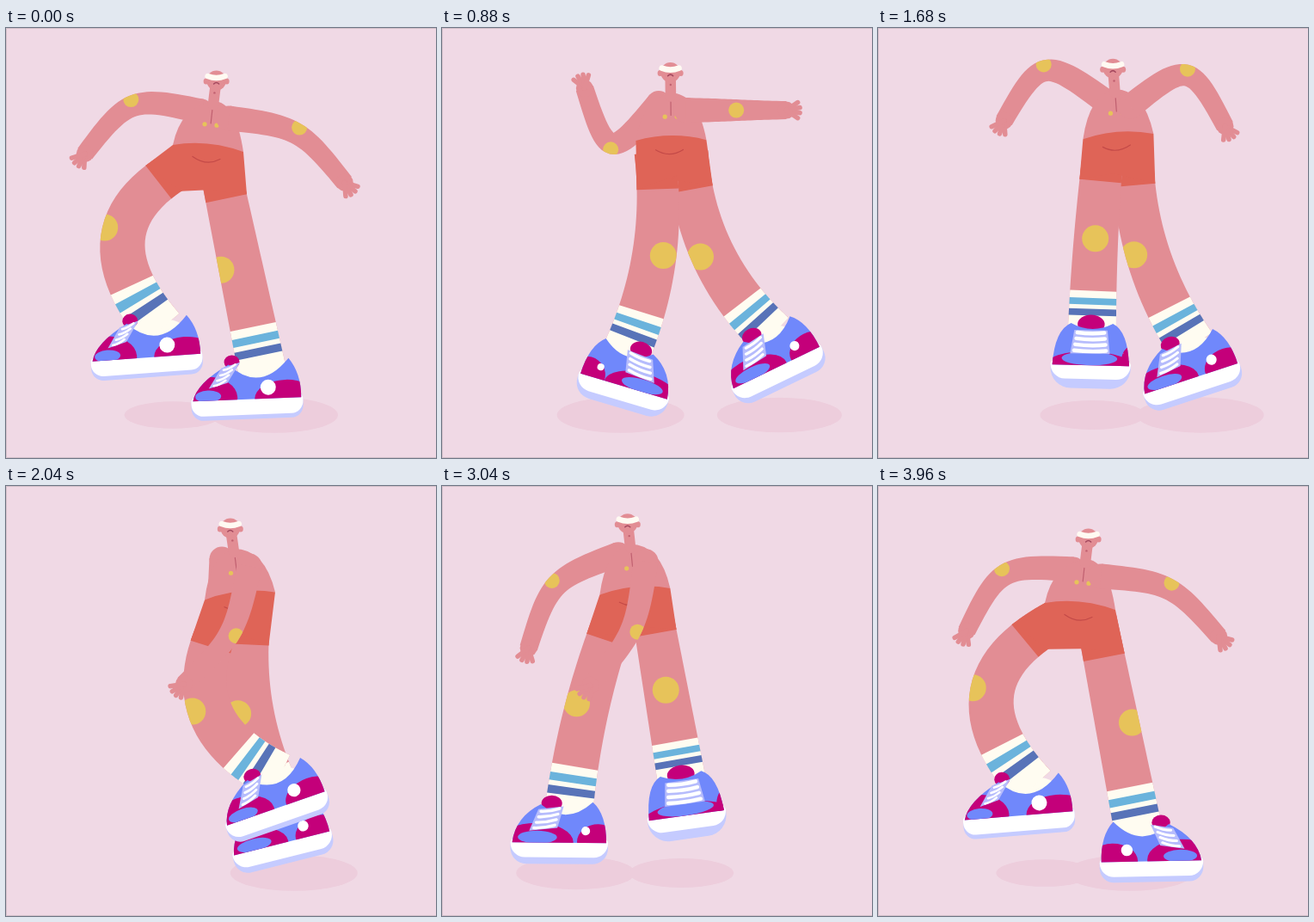
An HTML page with a canvas that plays this animation: 500 px wide and 500 px high, repeating every 4 s.

```html
<!DOCTYPE html>
<html lang="en">
<head>
<meta charset="utf-8">
<title>Dancer in sneakers</title>
<style>
html, body { margin: 0; width: 100%; height: 100%; overflow: hidden; background: #f0d9e5; }
canvas { display: block; width: 100vmin; height: 100vmin; }
</style>
</head>
<body>
<canvas width="500" height="500"></canvas>
<script>
const ctx = document.querySelector('canvas').getContext('2d');
const LOOP = 4000, STEP = 40, ARM = 162, LEG = 250;
const SKIN = '#e28d94', LINE = '#c06070', SHORTS = '#df6457', YELLOW = '#e7c35a', CREAM = '#fffcf1';
const MAGENTA = '#c4007a', BLUE = '#7088fb', LAVENDER = '#b6bcfc';

// Key poses, left limb first. waist: x, y, lean; feet: x, y, yaw (-1 left, 1 right);
// hands: direction from the shoulder in degrees, reach. Everything else follows from these.
const opening = { at: 0, waist: [235, 140, 6], feet: [[180, 350, -1], [298, 399, -1]], hands: [[160, 144], [29, 154]] };
const poses = [
  opening,
  { at: 400, waist: [244, 138, 0], feet: [[237, 385, 0], [384, 354, -.6]], hands: [[147, 104], [78, 158]] },
  { at: 1360, waist: [282, 125, -1], feet: [[191, 364, .65], [383, 364, -.65]], hands: [[236, 81], [-78, 75]] },
  { at: 2040, waist: [272, 128, -7], feet: [[318, 338, -.85], [325, 378, -.7]], hands: [[86, 161], [119, 157]] },
  { at: 2600, waist: [232, 129, 5], feet: [[110, 360, -.55], [233, 390, 0]], hands: [[85, 161], [79, 152]] },
  { at: 3400, waist: [222, 118, -13], feet: [[177, 386, -.6], [312, 304, 0]], hands: [[170, 143], [140, 162]] },
  { ...opening, at: 3960, feet: [opening.feet[0], [303, 402, .75]], hands: [[150, 143], [27, 154]] }
];

const lerp = (a, b, k) => a + (b - a) * k;

// Periodic Hermite interpolation with limited slopes, so poses never overshoot.
function sample(time, pick) {
  const n = poses.length;
  const pose = i => poses[(i + n) % n];
  const at = i => pose(i).at + Math.floor(i / n) * LOOP;
  const i = poses.findLastIndex(p => p.at <= time);
  const span = at(i + 1) - at(i), u = (time - at(i)) / span;
  return pick(pose(i)).map((a, c) => {
    const value = j => pick(pose(j))[c];
    const slope = j => (value(j + 1) - value(j)) / (at(j + 1) - at(j));
    const tangent = j => {
      const p = slope(j - 1), q = slope(j);
      return p * q <= 0 ? 0 : 2 * p * q / (p + q);
    };
    return lerp(a, value(i + 1), u * u * (3 - 2 * u))
      + span * u * (1 - u) * ((1 - u) * tangent(i) - u * tangent(i + 1));
  });
}

function fill(color) { ctx.fillStyle = color; ctx.fill(); }

function ellipse(x, y, rx, ry, color) {
  ctx.beginPath();
  ctx.ellipse(x, y, rx, ry, 0, 0, 7);
  fill(color);
}

function line(x0, y0, cx, cy, x1, y1, width, color) {
  ctx.beginPath();
  ctx.moveTo(x0, y0);
  ctx.quadraticCurveTo(cx, cy, x1, y1);
  ctx.lineWidth = width;
  ctx.strokeStyle = color;
  ctx.stroke();
}

function polygon(points, color) {
  ctx.beginPath();
  points.forEach(p => ctx.lineTo(...p));
  fill(color);
}

// The middle joint moves sideways as the ends come closer than the limb is long.
function middleJoint([x0, y0], [x1, y1], length, side) {
  const dx = x1 - x0, dy = y1 - y0, d = Math.hypot(dx, dy);
  const bulge = side * .45 * Math.sqrt(Math.max(0, length * length - d * d));
  return [(x0 + x1) / 2 - dy / d * bulge, (y0 + y1) / 2 + dx / d * bulge];
}

// A tapered tube through three joints; a higher bend makes the middle joint sharper.
function makeLimb(start, middle, end, bend, startWidth, endWidth) {
  const axis = k => {
    const a = start[k], b = end[k];
    const c = (middle[k] - (.5 - .375 * bend) * (a + b)) / (.75 * bend);
    const p = lerp(a, c, bend), q = lerp(b, c, bend);
    return t => {
      const s = 1 - t;
      return [s*s*s*a + 3*s*s*t*p + 3*s*t*t*q + t*t*t*b,
              s*s*(p - a) + 2*s*t*(q - p) + t*t*(b - q)];
    };
  };
  const fx = axis(0), fy = axis(1);
  const offset = (t, d) => {
    const [x, dx] = fx(t), [y, dy] = fy(t), len = Math.hypot(dx, dy) || 1;
    return [x - dy / len * d, y + dx / len * d];
  };
  const edge = (t, side) => offset(t, side * lerp(startWidth, endWidth, t) / 2);
  const band = (t0, t1, color) => {
    const left = [], right = [];
    for (let i = 0; i <= 28; i++) {
      const t = lerp(t0, t1, i / 28);
      left.push(edge(t, 1));
      right.unshift(edge(t, -1));
    }
    polygon(left.concat(right), color);
  };
  const patch = (d, r) => {
    ctx.save();
    band(0, 1, SKIN);
    ctx.clip();
    ellipse(...offset(.5, d), r, r, YELLOW);
    ctx.restore();
  };
  return { offset, edge, band, patch };
}

function drawArm(shoulder, [degrees, reach], side) {
  const angle = degrees * Math.PI / 180;
  const wrist = [shoulder[0] + Math.cos(angle) * reach, shoulder[1] + Math.sin(angle) * reach];
  const fold = -side * Math.tanh(8 * Math.sin(angle));
  const elbow = middleJoint(shoulder, wrist, ARM, fold);
  const arm = makeLimb(shoulder, elbow, wrist, .95, 29, 21);
  ellipse(...shoulder, 14.5, 14.5, SKIN);
  arm.patch(8 * fold, 9);
  const [x, y] = wrist, [bx, by] = arm.offset(.92, 0);
  const aim = Math.atan2(y - by, x - bx);
  ellipse(x, y, 10, 10, SKIN);
  for (let i = 0; i < 4; i++) {
    const a = aim - .6 + i * .4;
    line(x, y, x, y, x + Math.cos(a) * 16, y + Math.sin(a) * 16, 5.5, SKIN);
  }
}

// Every measure is mixed from a front view and a side view facing left.
function drawShoe([x, y], tilt, yaw) {
  const turn = Math.abs(yaw), mix = (front, side) => lerp(front, side, turn);
  const mid = mix(0, -19), half = mix(46, 65), top = mix(38, 27), height = mix(32, 28);
  const sole = (h, color) => {
    ctx.beginPath();
    ctx.roundRect(mid - half, top, half * 2, h, [6, 6, mix(24, 14), mix(24, 14)]);
    fill(color);
  };
  const lace = (i, extra = 0) => {
    const cx = mix(0, -38 - 4 * i), cy = mix(5 + 7 * i, -6 + 6 * i);
    const reach = mix(16 + i, 7) + extra, drop = mix(0, 3);
    return [[cx - reach, cy + drop], [cx + reach, cy - drop]];
  };
  ctx.save();
  ctx.translate(x, y);
  ctx.rotate(tilt);
  if (yaw > 0) ctx.scale(-1, 1);
  sole(height, '#c5cbff');
  sole(height - mix(11, 5), '#fff');
  ellipse(mix(0, -35), mix(-5, -12), mix(16, 9), mix(11, 8), MAGENTA);

  ctx.save();
  ctx.beginPath();
  ctx.moveTo(mid - half + 2, top + 5);
  ctx.quadraticCurveTo(mix(-42, -77), mix(2, 11), mix(-24, -39), mix(-6, -9));
  ctx.quadraticCurveTo(mix(0, -4), mix(6, 26), mix(24, 31), mix(-6, -14));
  ctx.quadraticCurveTo(mix(42, 45), mix(2, 4), mid + half - 2, top + 5);
  fill(BLUE);
  ctx.clip();
  ellipse(mix(0, -66), mix(45, 29), mix(52, 36), mix(18, 25), MAGENTA);
  ellipse(mix(0, -64), mix(35, 27), mix(33, 15), mix(8, 7), BLUE);
  ellipse(mix(46, 26), mix(40, 32), mix(10, 36), mix(20, 21), MAGENTA);
  ellipse(mix(38, 6), mix(28, 19), 9 * turn, 9 * turn, '#fff');
  ctx.restore();

  const [a, b] = lace(-.4, 4), [c, d] = lace(3.5, 4);
  polygon([a, b, d, c], LAVENDER);
  for (let i = 0; i < 4; i++) {
    const [[lx, ly], [rx, ry]] = lace(i);
    line(lx, ly, (lx + rx) / 2, (ly + ry) / 2 + 2, rx, ry, mix(4.5, 2.5), '#fff');
  }
  ctx.restore();
}

function makeLeg(hip, [x, y, yaw]) {
  const ankle = [x, y], knee = middleJoint(hip, ankle, LEG, -yaw);
  const shin = Math.atan2(x - knee[0], y - knee[1]);
  const tilt = -.8 * shin * (1 - .75 * yaw * yaw) + .1 * Math.sin(Math.PI * yaw);
  return { ...makeLimb(hip, knee, ankle, 2 / 3, 47, 56), ankle, tilt, yaw };
}

function drawShadow({ ankle: [x, y], tilt, yaw }) {
  const bottom = y + 70 - 15 * Math.abs(yaw) + 70 * Math.abs(Math.sin(tilt));
  const rx = 74 - .42 * Math.max(0, 452 - bottom);
  ellipse(x - 14 * yaw, 450, rx, rx * .28, '#edcddc');
}

function drawLeg(leg) {
  leg.patch(-23 * leg.yaw, 15.5);
  leg.band(0, .18, SHORTS);
  ellipse(...leg.ankle, 27, 12, CREAM);
  leg.band(.79, 1, CREAM);
  leg.band(.83, .867, '#6bb3dc');
  leg.band(.89, .927, '#5873b8');
  drawShoe(leg.ankle, leg.tilt, leg.yaw);
}

function drawTorso([x, y], [nx, ny], tilt, leftLeg, rightLeg) {
  const lx = x - 41, rx = x + 41, ly = y - 41 * tilt, ry = y + 41 * tilt;
  const down = k => [lerp(nx, x, k), lerp(ny, y, k)];

  ctx.beginPath();
  ctx.moveTo(lx, ly);
  ctx.quadraticCurveTo(lerp(lx, nx, .2), ny + 6, nx, ny);
  ctx.quadraticCurveTo(lerp(rx, nx, .25), ny, rx, ry);
  fill(SKIN);

  ctx.beginPath();
  ctx.moveTo(lx, ly);
  ctx.quadraticCurveTo(x, y - 11, rx, ry);
  [rightLeg.edge(.18, -1), rightLeg.edge(.12, 1), leftLeg.edge(.12, -1), leftLeg.edge(.18, 1)]
    .forEach(p => ctx.lineTo(...p));
  fill(SHORTS);

  const smileX = x - 2, smileY = y + 11;
  line(smileX - 16, smileY - 16 * tilt, smileX, smileY + 10, smileX + 16, smileY + 16 * tilt, 1.2, '#c44a48');
  line(...down(.15), ...down(.3), ...down(.47), 1.2, LINE);
  const [cx, cy] = down(.5);
  for (const d of [-7, 7]) ellipse(cx + d, cy + d * tilt, 2.6, 2.6, YELLOW);
}

function drawHead([nx, ny], [hx, hy]) {
  line(nx, ny + 4, (nx + hx) / 2, (ny + hy) / 2, hx, hy, 12.5, SKIN);
  ellipse(hx, hy, 11.5, 11.5, SKIN);
  for (const d of [-12, 12]) ellipse(hx + d, hy + 1, 3, 3.5, SKIN);
  line(hx - 10, hy - 5, hx, hy - 1, hx + 10, hy - 5, 6.5, '#fffaf2');
  line(hx - 3, hy + 4, hx, hy + 1, hx + 3, hy + 4, 1.5, '#a4485e');
  ellipse(lerp(hx, nx, .6), lerp(hy, ny, .6), 1.2, 1.2, LINE);
}

function draw(time) {
  const [x, y, lean] = sample(time, p => p.waist);
  const feet = [0, 1].map(i => sample(time, p => p.feet[i]));
  const hands = [0, 1].map(i => sample(time, p => p.hands[i]));
  const tilt = .13 * Math.tanh(lean / 6);
  const neck = [x + lean, y - 55], head = [neck[0] + lean * .6, neck[1] - 24];
  const spread = 20 - 4 * Math.abs(feet[0][2] + feet[1][2]);
  const [leftLeg, rightLeg] = [-spread, spread].map((d, i) => makeLeg([x + d, y + 13 + d * tilt], feet[i]));

  ctx.fillStyle = '#f0d9e5';
  ctx.fillRect(0, 0, 500, 500);
  drawShadow(leftLeg);
  drawShadow(rightLeg);
  drawArm([neck[0] - 14, neck[1] + 12], hands[0], -1);
  drawLeg(rightLeg);
  drawLeg(leftLeg);
  drawTorso([x, y], neck, tilt, leftLeg, rightLeg);
  drawHead(neck, head);
  drawArm([neck[0] + 18, neck[1] + 20], hands[1], 1);
  ctx.fillStyle = '#d3c0ca';
  ctx.fillRect(0, 0, 500, 1);
  ctx.fillRect(0, 0, 1, 500);
  ctx.fillRect(0, 499, 500, 1);
}

ctx.lineCap = ctx.lineJoin = 'round';
let start;
function tick(now) {
  start ??= now;
  draw(Math.floor((now - start) % LOOP / STEP) * STEP);
  requestAnimationFrame(tick);
}
draw(0);
requestAnimationFrame(tick);
</script>
</body>
</html>
```
